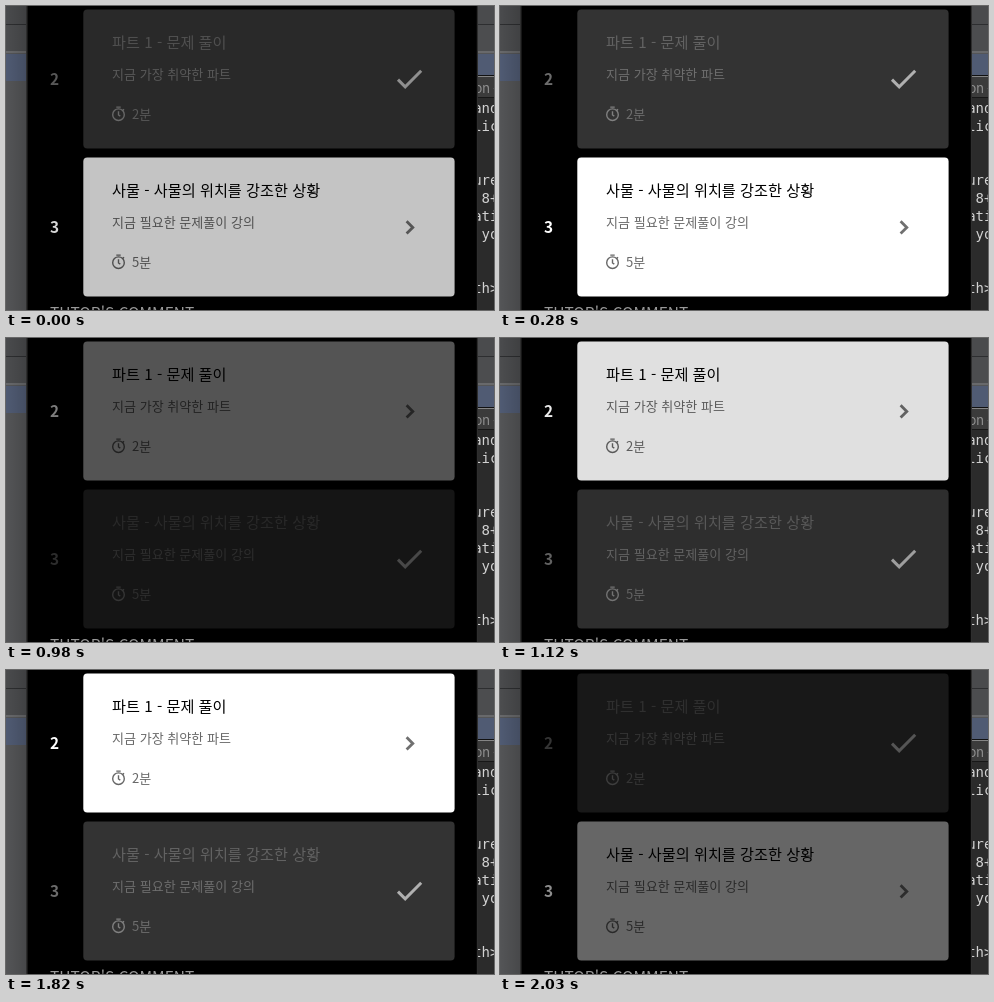
Animation of 488 by 304 pixels, one loop 2100 ms. Source, as an HTML page:

```html
<!DOCTYPE html>
<html lang="ko">
<head>
<meta charset="utf-8">
<style>
html, body { margin: 0; width: 100%; height: 100%; overflow: hidden; background: #000; }
svg { display: block; width: 488px; height: 304px; }
text { white-space: pre; font-family: "Noto Sans CJK KR", "Noto Sans CJK", "Noto Sans KR", sans-serif; font-size: 13.05px; }
.title { font-size: 15.2px; font-weight: 500; }
.num { font-size: 15.4px; font-weight: 700; }
.label { font-size: 15.5px; fill: #999; }
.term text { font: 14px "DejaVu Sans Mono", monospace; fill: #d2d2d2; }
.term .tab { font: 13px Inter, "Open Sans", sans-serif; fill: #929292; }
.line { fill: none; }
</style>
</head>
<body>
<svg viewBox="0 0 488 304">
  <defs>
    <linearGradient id="shadeL"><stop offset="0" stop-color="#000" stop-opacity="0"/><stop offset="1" stop-color="#000" stop-opacity=".16"/></linearGradient>
  </defs>
  <rect width="488" height="304" fill="#545557"/>
  <rect width="488" height="18" fill="#4a4b4d"/>
  <rect y="18" width="488" height="1" fill="#2d2e30"/>
  <rect y="19" width="488" height="27" fill="#4c4d4f"/>
  <rect y="45" width="488" height="2" fill="#68696b"/>
  <rect y="48" width="488" height="27" fill="#505b73"/>
  <rect width="21" height="304" fill="url(#shadeL)"/>
  <g class="term" id="term">
    <rect x="470" y="69" width="18" height="235" fill="#2b2b2b"/>
    <rect x="470" y="69" width="18" height="1" fill="#111"/>
    <rect x="470" y="70" width="18" height="1" fill="#858585"/>
    <rect x="470" y="71" width="18" height="20" fill="#3b3b3b"/>
    <rect x="470" y="91" width="18" height="1" fill="#171717"/>
    <text class="tab" x="468.5" y="87">on —</text>
  </g>
  <rect x="20" y="-2" width="452" height="308" fill="#2e2e2e"/>
  <rect x="21.5" y="-2" width="449.3" height="308" fill="#000"/>
  <text class="label" x="44" y="313.2">TUTOR'S COMMENT</text>
  <g id="cards"></g>
</svg>
<script>
const LOOP = 2100, STEP = 70;
const SWITCH = 910, CLEAR = 1890;
// brightness after each card swap, one value per step
const FADE_B = [.04, .33, .68, .88, .97, 1];
const FADE_A = [0, .06, .4, .77, .92, .97, .99, 1];

const CARDS = [
  { y: 0, num: 2, title: '파트 1 - 문제 풀이', sub: '지금 가장 취약한 파트', time: '2분' },
  { y: 148, num: 3, title: '사물 - 사물의 위치를 강조한 상황', sub: '지금 필요한 문제풀이 강의', time: '5분' }
];
const ACTIVE = { card: '#fff', title: '#000', sub: '#686868', icon: '#666', num: '#fff' };
const DONE = { card: '#333', title: '#626262', sub: '#6e6e6e', icon: '#808080', num: '#6c6c6c' };

const byId = id => document.getElementById(id);
const text = (x, y, fill, str, cls = '') =>
  `<text class="${cls}" x="${x}" y="${y}" fill="${fill}">${str}</text>`;
const line = (d, color, width) =>
  `<path class="line" d="${d}" stroke="${color}" stroke-width="${width}"/>`;

const CHEVRON = line('M400.6 67.2l6.2 6.2-6.2 6.2', '#707070', 2.8);
const CHECK = line('M392 73.6l7.2 7.2 16-16', '#b0b0b0', 3);

function timer(color) {
  return `<circle class="line" cx="112.5" cy="108.7" r="5.8" stroke="${color}" stroke-width="1.4"/>` +
    line('M110.3 101.1h4.4M112.5 105.3v3.7l1.8 1.2M116.7 104.5l1.3-1.3', color, 1.4);
}

function drawCard(c, active) {
  const k = active ? ACTIVE : DONE;
  return `<g transform="translate(0 ${c.y})">
    <g class="num-box">${text(44, 79, k.num, c.num, 'num')}</g>
    <g class="body">
      <rect x="77.3" y="3.6" width="371.3" height="139" rx="4" fill="${k.card}"/>
      ${text(106, 42, k.title, c.title, 'title')}
      ${text(106, 72.8, k.sub, c.sub)}
      ${timer(k.icon)}
      ${text(126, 112.8, k.sub, c.time)}
      ${active ? CHEVRON : CHECK}
    </g></g>`;
}

function drawState(current) {
  const g = document.createElementNS('http://www.w3.org/2000/svg', 'g');
  g.innerHTML = CARDS.map((c, i) => drawCard(c, i === current)).join('');
  byId('cards').append(g);
  const bodies = [...g.querySelectorAll('.body')];
  const nums = [...g.querySelectorAll('.num-box')];
  return level => {
    g.style.display = level > 0 ? '' : 'none';
    bodies.forEach((b, i) => b.setAttribute('opacity', level ** (i === current ? 1 : .8)));
    nums.forEach((n, i) => n.setAttribute('opacity', level ** (i === current ? .65 : .8)));
  };
}

const TERM = { 0: 'and', 1: 'lic', 4: 'ure', 5: ' 8+', 6: 'ati', 7: ' yo', 10: 'th>' };
byId('term').insertAdjacentHTML('beforeend', Object.entries(TERM)
  .map(([row, str]) => text(467.2, 107 + row * 18, '', str.replace('>', '&gt;'))).join(''));

const showA = drawState(1), showB = drawState(0);
const level = (table, ms) => table[Math.min(Math.floor(ms / STEP), table.length - 1)];

function render(t) {
  const isB = t >= SWITCH && t < CLEAR;
  showB(isB ? level(FADE_B, t - SWITCH) : 0);
  showA(isB ? 0 : level(FADE_A, (t - CLEAR + LOOP) % LOOP));
}

const start = performance.now();
function tick() {
  render((performance.now() - start) % LOOP);
  requestAnimationFrame(tick);
}
render(0);
requestAnimationFrame(tick);
</script>
</body>
</html>
```
